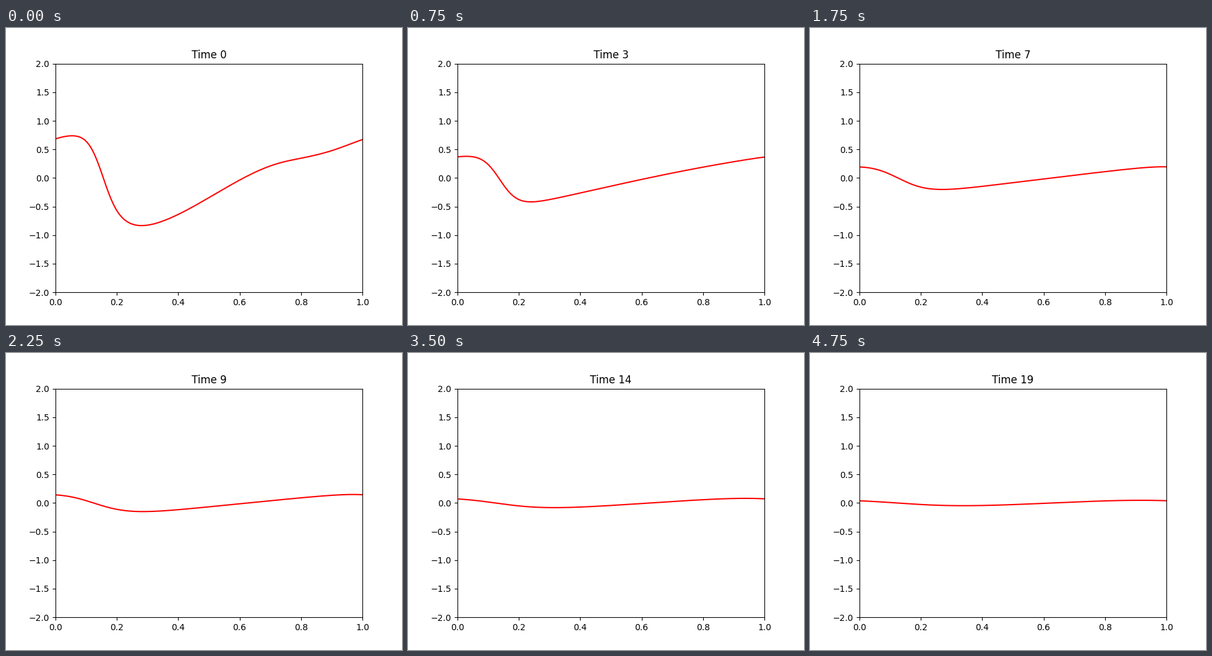
Write a matplotlib script that moves like this. It is 640x480 px and loops after 5000 ms.

```python
import numpy as np
import matplotlib.pyplot as plt
from matplotlib.animation import FuncAnimation

# Viscous Burgers equation on a periodic domain of length 2*pi,
# solved exactly with the Cole-Hopf transform.
NU = 0.1
POINTS = 128
FINE = 4 * POINTS
PERIOD = POINTS / (POINTS - 1)   # the plotted axis leaves out the wrap point

# Key points of the starting wave: crest, steep front, trough, long ramp.
KEYS = [(0, 0.685), (0.055, 0.738), (0.1, 0.64), (0.13, 0.38),
        (0.18, -0.36), (0.22, -0.705), (0.28, -0.832), (0.36, -0.732),
        (0.48, -0.405), (0.6, -0.036), (0.72, 0.247), (0.82, 0.368),
        (0.92, 0.514)]


def periodic_spline(keys, period, x):
    """Periodic cubic spline through the keys, evaluated at x."""
    px, py = np.transpose(keys)
    n = len(px)
    h = np.diff(np.append(px, px[0] + period))
    slope = (np.roll(py, -1) - py) / h
    a = np.zeros((n, n))
    for i in range(n):
        a[i, i - 1] = h[i - 1]
        a[i, i] = 2 * (h[i - 1] + h[i])
        a[i, (i + 1) % n] = h[i]
    m = np.linalg.solve(a, 6 * (slope - np.roll(slope, 1)))
    i = np.searchsorted(px, x, side="right") - 1
    j = (i + 1) % n
    s = x - px[i]
    return (py[i] + s * (slope[i] - h[i] * (2 * m[i] + m[j]) / 6)
            + s**2 * m[i] / 2 + s**3 * (m[j] - m[i]) / (6 * h[i]))


k = np.arange(FINE // 2 + 1)
start = periodic_spline(KEYS, PERIOD, np.arange(FINE) * PERIOD / FINE)
start_hat = np.fft.rfft(start) * np.exp(-(k / 14) ** 6)
start_hat[0] = 0
potential = np.fft.irfft(start_hat / (1j * np.maximum(k, 1)), FINE)
phi_hat = np.fft.rfft(np.exp(-potential / (2 * NU)))


def velocity(t):
    hat = phi_hat * np.exp(-NU * k**2 * t)
    phi = np.fft.irfft(hat, FINE)
    slope = np.fft.irfft(1j * k * hat, FINE)
    return (-2 * NU * slope / phi)[::FINE // POINTS]


fig, ax = plt.subplots(figsize=(6.4, 4.8), dpi=100)
ax.set_xlim(0, 1)
ax.set_ylim(-2, 2)
x = np.linspace(0, 1, POINTS)
line, = ax.plot(x, velocity(0), color="red", lw=1.5)
title = ax.set_title("Time 0")


def update(step):
    line.set_ydata(velocity(step))
    title.set_text(f"Time {step}")
    return line, title


anim = FuncAnimation(fig, update, frames=20, interval=250,
                     repeat=True, repeat_delay=0)
plt.show()
```
